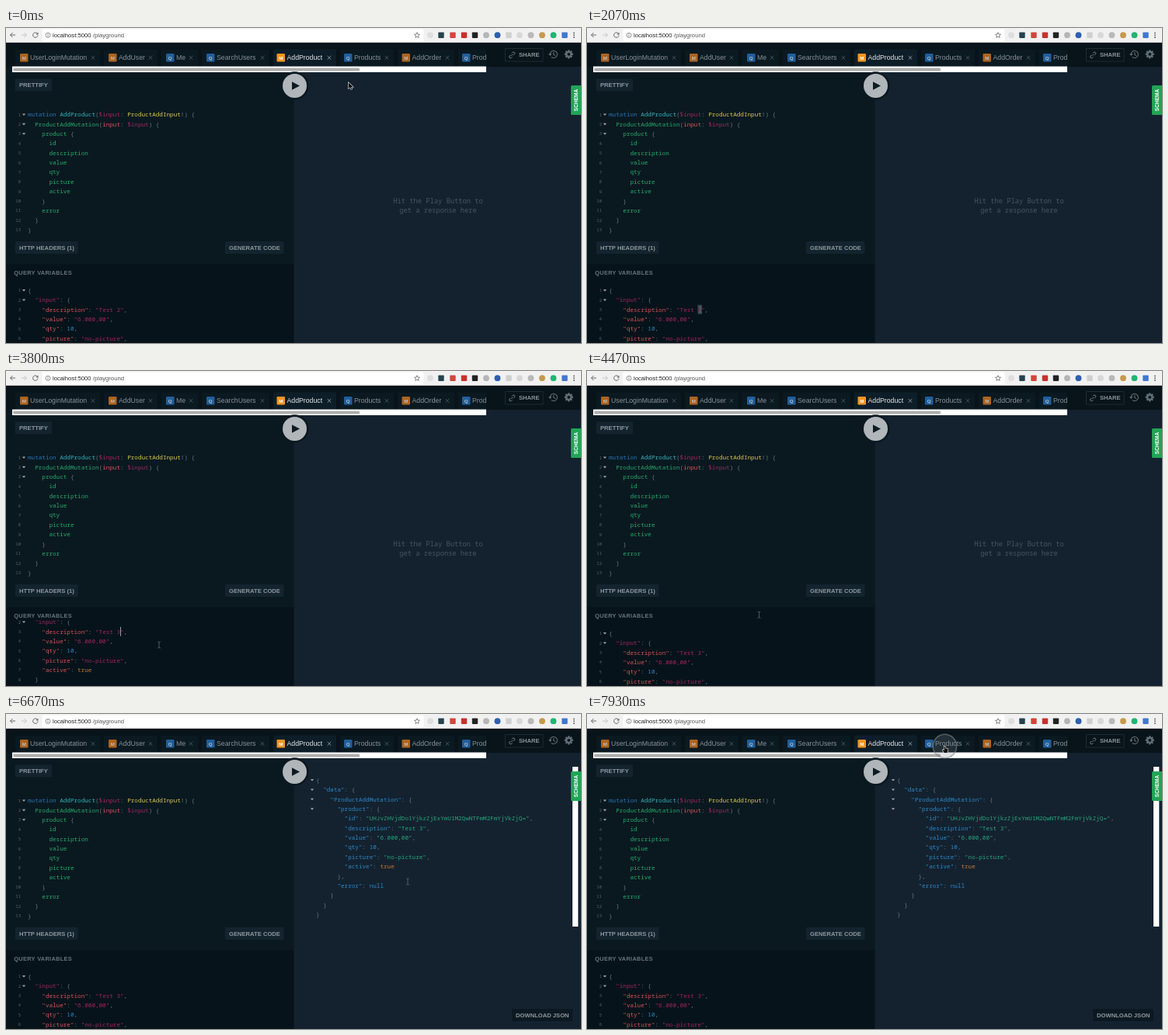
Write an HTML page with a canvas that moves like this. It is 740x406 px and loops after 8000 ms.

```html
<!DOCTYPE html>
<html lang="en">
<head>
<meta charset="utf-8">
<title>Playground</title>
<style>
  html, body { margin: 0; width: 100%; height: 100%; overflow: hidden; background: #0a1920; }
  canvas { display: block; width: 740px; height: 406px; }
</style>
</head>
<body>
<canvas id="stage"></canvas>
<script>
const W = 740, H = 406, LOOP = 8000, FPS = 15;
const canvas = document.getElementById('stage');
const ctx = canvas.getContext('2d');
const ratio = window.devicePixelRatio || 1;
canvas.width = W * ratio;
canvas.height = H * ratio;

const SANS = '"Liberation Sans", Arial, sans-serif';
const MONO = '"Noto Sans Mono", "DejaVu Sans Mono", monospace';
const CODE = 7.63, CHAR = 4.578, LINE = 12.38;

const INK = {
  blue: '#2474b5', cyan: '#36b3bd', green: '#27a96b', yellow: '#dcc94b', red: '#d9505a',
  pink: '#a3245f', orange: '#c27836', punct: '#68747d', number: '#2b86c0'
};
const VARIABLE_THEME = { key: INK.red, string: INK.pink, number: INK.number, word: INK.orange };
const RESULT_THEME = { key: '#2a88c6', string: '#2aa378', number: '#2a88c6', word: INK.orange };

const QUERY = [
  [['blue', 'mutation '], ['cyan', 'AddProduct'], ['punct', '('], ['pink', '$input'], ['punct', ': '],
   ['yellow', 'ProductAddInput'], ['punct', '!) {']],
  [['green', '  ProductAddMutation'], ['punct', '('], ['red', 'input'], ['punct', ': '],
   ['pink', '$input'], ['punct', ') {']],
  [['green', '    product '], ['punct', '{']],
  ...['id', 'description', 'value', 'qty', 'picture', 'active'].map(f => [['green', '      ' + f]]),
  [['punct', '    }']],
  [['green', '    error']],
  [['punct', '  }']],
  [['punct', '}']]
];

const fields = (n, indent) => [
  `"description": "Test ${n}",`, '"value": "6.000,00",', '"qty": 10,',
  '"picture": "no-picture",', '"active": true'
].map(s => ' '.repeat(indent) + s);

const RESULT = [
  '{', '  "data": {', '    "ProductAddMutation": {', '      "product": {',
  '        "id": "UHJvZHVjdDo1YjkzZjExYmU1M2QwNTFmM2FmYjVkZjQ=",',
  ...fields(3, 8), '      },', '      "error": null', '    }', '  }', '}'
];

// left, right, badge x, kind, label
const TABS = [
  [12, 121, 18, 'M', 'UserLoginMutation'], [126, 195, 132, 'M', 'AddUser'],
  [199.5, 247, 206, 'Q', 'Me'], [252, 339, 258, 'Q', 'SearchUsers'],
  [344, 425, 348.5, 'M', 'AddProduct'], [430, 499, 435, 'Q', 'Products'],
  [504, 577, 509.5, 'M', 'AddOrder'], [581.5, 650, 587, 'Q', 'Products']
];
const ACTIVE_TAB = 4;

// time, x, y, pointer shape on the way from here
const POINTER = [
  [0, 441, 70.5, 'arrow'], [200, 441, 70.5, 'arrow'], [670, 150, 362, 'arrow'], [800, 130, 370.5, 'arrow'],
  [1000, 136, 368, 'beam'], [1330, 146, 363, 'beam'], [2600, 146, 363, 'none'],
  [2870, 146, 363, 'beam'], [3330, 197, 353, 'beam'], [4330, 197, 353, 'beam'],
  [4870, 350, 110, 'arrow'], [5130, 371.5, 74.5, 'hand'], [5530, 371.5, 74.5, 'hand'],
  [5670, 395, 100, 'beam'], [6200, 517, 216, 'beam'], [6930, 517, 216, 'beam'],
  [7400, 480, 100, 'beam'], [7530, 468, 56, 'hand'], [7730, 460.5, 41.5, 'hand'], [8000, 460.5, 41.5, 'hand']
];
const CLICK_RUN = 5200, REPLY = 5930, CLICK_TAB = 7860, TYPED = 2650;

const clamp = v => Math.max(0, Math.min(1, v));
const ease = v => { v = clamp(v); return v * v * (3 - 2 * v); };

function rect(x, y, w, h, fill, r = 0) {
  ctx.fillStyle = fill;
  ctx.beginPath();
  ctx.roundRect(x, y, w, h, r);
  ctx.fill();
}

function disc(x, y, r, fill) {
  ctx.fillStyle = fill;
  ctx.beginPath();
  ctx.arc(x, y, r, 0, Math.PI * 2);
  ctx.fill();
}

function poly(points, fill, stroke, width = 1) {
  ctx.beginPath();
  points.forEach(([x, y], i) => i ? ctx.lineTo(x, y) : ctx.moveTo(x, y));
  ctx.closePath();
  if (stroke) { ctx.strokeStyle = stroke; ctx.lineWidth = width; ctx.stroke(); }
  if (fill) { ctx.fillStyle = fill; ctx.fill(); }
}

function path(d, color, width = 1) {
  ctx.strokeStyle = color;
  ctx.lineWidth = width;
  ctx.stroke(new Path2D(d));
}

// y is the middle of the capitals
function text(s, x, y, size, color, { weight = 400, family = SANS, align = 'left', spacing = 0 } = {}) {
  ctx.font = `${weight} ${size}px ${family}`;
  ctx.textAlign = align;
  ctx.letterSpacing = spacing + 'px';
  ctx.fillStyle = color;
  ctx.fillText(s, x, y + size * 0.36);
}

function tokens(parts, x, y) {
  let col = 0;
  for (const [color, s] of parts) {
    text(s, x + col * CHAR, y, CODE, color, { family: MONO });
    col += s.length;
  }
}

function jsonTokens(line, theme) {
  return line.match(/"[^"]*"|\d+|[a-z]+|[^"\da-z]+/g).map((s, i, all) => {
    let color = INK.punct;
    if (s[0] === '"') color = all[i + 1]?.[0] === ':' ? theme.key : theme.string;
    else if (/\d/.test(s)) color = theme.number;
    else if (s === 'null') color = theme.key;
    else if (/[a-z]/.test(s)) color = theme.word;
    return [color, s];
  });
}

const fold = (x, y) => poly([[x - 2.2, y - 1], [x + 2.2, y - 1], [x, y + 1.6]], '#9aa3a9');

const lineNumber = (n, y) =>
  text(n, 19, y + 0.2, 5.6, '#56636c', { family: MONO, align: 'right' });

function button(label, x, y, w, fill) {
  rect(x, y, w, 16, fill, 1.2);
  text(label, x + 5, y + 8, CODE, '#8c979e', { weight: 700 });
}

function browserBar() {
  rect(0, 0, W, 19, '#f1f1f1');
  rect(0, 18.3, W, 0.7, '#b9b9b9');
  rect(46.5, 1.5, 491, 15.5, '#fff', 1.5);
  path('M12 9H5.5M8.5 6L5.5 9L8.5 12', '#666', 1);
  path('M20 9H26.5M23.5 6L26.5 9L23.5 12', '#c6c6c6', 1);
  path('M40.4 7.2A3.2 3.2 0 1 0 41 9.5', '#666', 1);
  poly([[41.5, 5.5], [41.5, 8.6], [38.4, 8.6]], '#666');
  ctx.beginPath();
  ctx.arc(54, 9.3, 3, 0, 7);
  ctx.strokeStyle = '#666';
  ctx.lineWidth = 0.7;
  ctx.stroke();
  rect(53.6, 8.8, 0.8, 2.3, '#666');
  rect(53.6, 7.3, 0.8, 0.9, '#666');
  text('localhost:5000', 60, 9.3, 7.7, '#222');
  text('/playground', 111.8, 9.3, 7.7, '#555');

  const star = [];
  for (let i = 0; i < 10; i++) {
    const a = i * Math.PI / 5 - Math.PI / 2, r = i % 2 ? 1.6 : 3.7;
    star.push([529 + r * Math.cos(a), 9.4 + r * Math.sin(a)]);
  }
  poly(star, null, '#555', 0.7);

  const squares = [[560, '#26424f'], [575, '#d3453b'], [589.5, '#c8302c'], [603.5, '#222'],
                   [647, '#d0d0d0'], [719, '#3f78d0']];
  const discs = [[546, '#dedede'], [618, '#b5b5b5'], [632.5, '#2d5fb0'], [661, '#d8d8d8'],
                 [675.5, '#b9b9b9'], [690, '#c59a4c'], [704.5, '#22b573']];
  squares.forEach(([x, c]) => rect(x - 3.7, 5.5, 7.4, 7.4, c, 0.8));
  discs.forEach(([x, c]) => disc(x, 9.2, 3.9, c));
  [6.4, 9.2, 12].forEach(y => disc(731, y, 0.9, '#555'));
}

function tabBar() {
  rect(0, 19, W, 31, '#08131a');
  ctx.save();
  ctx.beginPath();
  ctx.rect(0, 19, 618, 31);
  ctx.clip();
  TABS.forEach(([left, right, bx, kind, label], i) => {
    const on = i === ACTIVE_TAB;
    rect(left, 27.5, right - left, 22.5, on ? '#0d1e28' : '#0b1921', 1.2);
    const fill = kind === 'M' ? (on ? '#f7941e' : '#ad6420') : '#215f9c';
    rect(bx, 33, 10.5, 10.5, fill, 1.2);
    text(kind, bx + 5.25, 38.3, 6.2, on ? '#fff' : '#b8c0c5', { weight: 700, align: 'center' });
    text(label, bx + 13, 38.2, 8.72, on ? '#e3e6e8' : '#87929a');
    const cx = right - 9;
    path(`M${cx - 2.3} 36l4.6 4.6m0-4.6l-4.6 4.6`, on ? '#a5adb2' : '#56626a', 0.8);
  });
  ctx.restore();

  ctx.strokeStyle = '#1d2b34';
  ctx.lineWidth = 1;
  ctx.strokeRect(642.5, 26.5, 48.5, 16.5);
  path('M650.3 35.8L652.2 33.9M651 32.5l1-1a1.6 1.6 0 0 1 2.3 2.3l-1.1 1.1M651.5 37.3l-1 1a1.6 1.6 0 0 1-2.3-2.3l1.1-1.1',
    '#87929a', 0.9);
  text('SHARE', 660, 34.4, CODE, '#87929a', { weight: 700 });

  path('M700.2 34A4.6 4.6 0 1 1 701.8 37.4M704.8 31V34.3L707 35.6', '#616e76', 1.1);
  poly([[698, 33.2], [702.6, 33.2], [700.3, 36]], '#616e76');

  for (let i = 0; i < 8; i++) {
    ctx.save();
    ctx.translate(724.3, 33.8);
    ctx.rotate(i * Math.PI / 4);
    rect(-1.2, -5.6, 2.4, 3, '#616e76', 0.4);
    ctx.restore();
  }
  disc(724.3, 33.8, 4.3, '#616e76');
  disc(724.3, 33.8, 1.9, '#08131a');
}

function queryEditor() {
  button('PRETTIFY', 12, 65.3, 47, '#13242e');
  QUERY.forEach((parts, i) => {
    const y = 111.4 + i * LINE;
    lineNumber(i + 1, y);
    if (i < 3) fold(23, y);
    tokens(parts.map(([c, s]) => [INK[c], s]), 28, y);
  });
  button('HTTP HEADERS (1)', 12, 275, 80.5, '#13242e');
  button('GENERATE CODE', 282, 275, 75.5, '#13242e');
}

function variables(t) {
  rect(0, 304.5, 370.5, 102, '#07131a');
  text('QUERY VARIABLES', 10.3, 315.4, 7.4, '#68747c', { weight: 700, spacing: 0.3 });

  const scroll = 27 * (ease((t - 3000) / 330) - ease((t - 3930) / 330));
  const lines = ['{', '  "input": {', ...fields(t < TYPED ? 2 : 3, 4), '  }', '}'];
  const caretX = 28 + 25 * CHAR;
  ctx.save();
  ctx.beginPath();
  ctx.rect(0, 321.5, 370, 85);
  ctx.clip();
  lines.forEach((line, i) => {
    const y = 338 + i * LINE - scroll;
    if (i === 2 && t >= 1460 && t < TYPED) rect(caretX, y - 6, CHAR + 0.8, 12, '#36434c');
    lineNumber(i + 1, y);
    if (i < 2) fold(23, y);
    const theme = i === 1 ? { ...VARIABLE_THEME, key: INK.pink } : VARIABLE_THEME;
    tokens(jsonTokens(line, theme), 28, y);
    const blink = (t - TYPED) % 1060 < 530;
    if (i === 2 && t >= TYPED && t < CLICK_RUN && blink) rect(caretX + CHAR, y - 6, 0.9, 12, '#a7aeb3');
  });
  ctx.restore();
}

function response(t) {
  rect(370.5, 50, W - 370.5, H - 50, '#142230');
  if (t < CLICK_RUN) {
    const style = { weight: 300, family: MONO, align: 'center' };
    text('Hit the Play Button to', 556, 222.5, 8.76, '#465462', style);
    text('get a response here', 556, 235, 8.76, '#465462', style);
    return;
  }
  button('DOWNLOAD JSON', 651, 380, 78, '#0c1922');
  if (t < REPLY) {
    const turn = (t - 5330) / 1100 * Math.PI * 2;
    const ring = (from, to, color) => {
      ctx.beginPath();
      ctx.arc(556.3, 228.3, 7.8, from, to);
      ctx.strokeStyle = color;
      ctx.lineWidth = 2.8;
      ctx.stroke();
    };
    ring(0, Math.PI * 2, '#283643');
    ring(turn - 0.9, turn + 0.9, '#747e86');
    return;
  }
  RESULT.forEach((line, i) => {
    const y = 85 + i * LINE;
    if (i < 4) fold(394, y);
    tokens(jsonTokens(line, RESULT_THEME), 399, y);
  });
  rect(729, 68, 7.3, 206, '#fff');
}

function overlays() {
  rect(8, 49.6, 610, 7.4, '#fff');
  rect(9.2, 51.6, 446, 4, '#adadad', 2);

  disc(371.5, 74.5, 18.2, '#0a1820');
  disc(371.5, 74.5, 15.5, '#b0b6ba');
  poly([[368, 69.3], [378, 74.5], [368, 79.7]], '#0d1a21');

  rect(727, 74, 16, 38, '#22a455', 1.5);
  ctx.save();
  ctx.translate(734, 93);
  ctx.rotate(-Math.PI / 2);
  text('SCHEMA', 0, 0, 6.54, '#fff', { weight: 700, align: 'center' });
  ctx.restore();
}

function tooltip() {
  rect(440, 80, 46, 10, '#8d8d8d');
  rect(440.5, 80.5, 45, 9, '#e4e4e4');
  text('New recording', 463, 85.2, 6.2, '#222', { align: 'center' });
}

const SHAPES = {
  none() {},
  arrow() {
    poly([[0, 0], [0, 7.4], [1.8, 5.8], [3, 8.4], [4.2, 7.9], [3.1, 5.4], [5.4, 5.4]], '#000', '#e4e4e4', 1.3);
  },
  beam() {
    path('M-1.8 -4Q0 -4 0 -3V3Q0 4 -1.8 4M1.8 -4Q0 -4 0 -3M0 3Q0 4 1.8 4', '#626d75', 0.8);
  },
  hand() {
    poly([[-0.8, 0], [0.6, 0], [0.7, 2.8], [3.8, 3.6], [4, 5.8], [3, 8.6], [-0.8, 8.6],
          [-3, 5], [-2.2, 4.3], [-0.8, 5.5]], '#111', '#e6e6e6', 1.2);
  }
};

function pointer(t) {
  let i = POINTER.length - 2;
  while (POINTER[i][0] > t) i--;
  const [t0, x0, y0, shape] = POINTER[i], [t1, x1, y1] = POINTER[i + 1];
  const k = ease((t - t0) / (t1 - t0));
  const x = x0 + (x1 - x0) * k, y = y0 + (y1 - y0) * k;
  if (t >= CLICK_TAB) {
    disc(x, y, 15.8, 'rgba(120,128,132,.22)');
    ctx.beginPath();
    ctx.arc(x, y, 15.2, 0, Math.PI * 2);
    ctx.strokeStyle = 'rgba(125,132,136,.6)';
    ctx.lineWidth = 1.4;
    ctx.stroke();
  }
  ctx.save();
  ctx.translate(x, y);
  SHAPES[shape]();
  ctx.restore();
}

function draw(t) {
  ctx.setTransform(ratio, 0, 0, ratio, 0, 0);
  rect(0, 0, W, H, '#0a1920');
  tabBar();
  queryEditor();
  variables(t);
  response(t);
  overlays();
  browserBar();
  if (t >= 400 && t < 1200) tooltip();
  pointer(t);
}

const start = performance.now();
function tick(now) {
  const t = Math.max(0, now - start) % LOOP;
  draw(Math.floor(t * FPS / 1000 + 0.01) * 1000 / FPS);
  requestAnimationFrame(tick);
}
draw(0);
requestAnimationFrame(tick);
</script>
</body>
</html>
```
